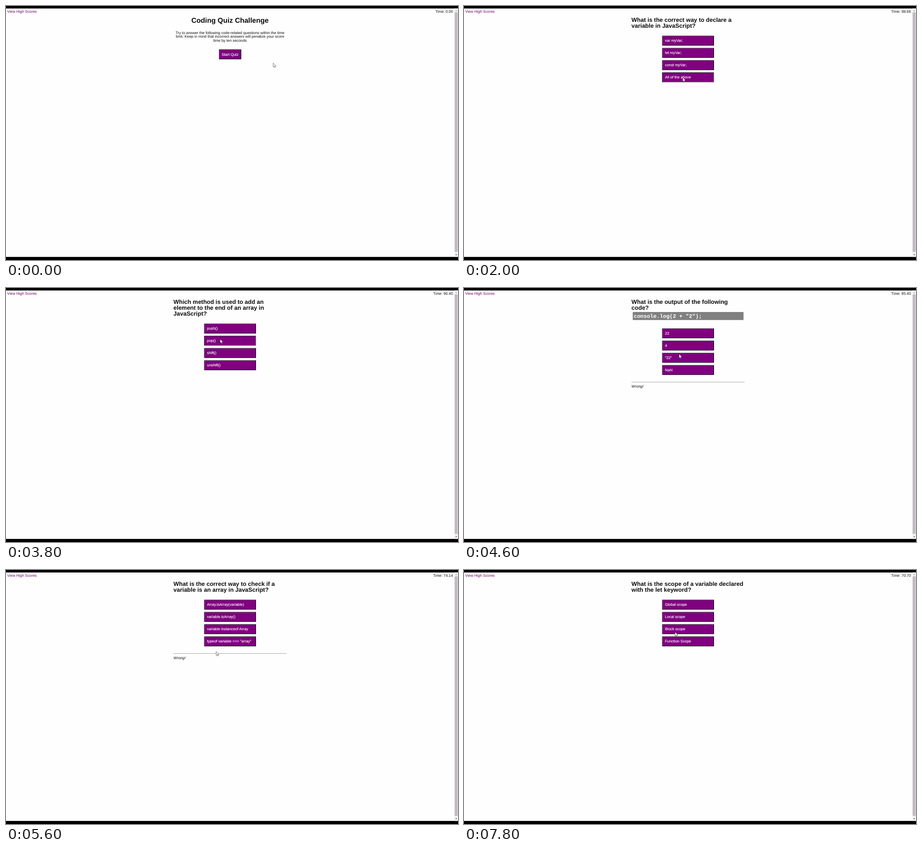
An HTML page that plays this animation: 998x561 px, repeating every 8000 ms.

```html
<!DOCTYPE html>
<html lang="en">
<head>
<meta charset="utf-8">
<title>Coding Quiz Challenge</title>
<style>
  html, body { margin: 0; width: 100%; height: 100%; overflow: hidden; background: #000; }
  svg { display: block; width: 100vw; height: 100vh; }
  text { font: 8.317px "Liberation Sans", Arial, sans-serif; fill: #0c0c0c; white-space: pre; text-rendering: geometricPrecision; }
  .title { font-size: 15.6px; font-weight: bold; }
  .question { font-size: 12.99px; font-weight: bold; }
  .code { font: bold 11.95px "Liberation Mono", "Courier New", monospace; fill: #fff; }
  .label { fill: #fff; stroke: #fff; stroke-width: .15px; }
  .link { fill: #6c006c; }
  .verdict { font-style: italic; }
  .mid { text-anchor: middle; }
  .end { text-anchor: end; }
</style>
</head>
<body>
<svg viewBox="0 0 998 561">
  <rect width="998" height="561" fill="#000"/>
  <rect y="5.5" width="998" height="548.7" fill="#fefefe"/>
  <rect x="990" y="5.5" width="8" height="548.7" fill="#f3f1f3"/>
  <rect x="990.6" y="14" width="6.6" height="529" fill="#c1bcc1"/>
  <path d="M992 11.2h4l-2-2.4z" fill="#a3a3a3"/>
  <path d="M992 548.4h4l-2 2.4z" fill="#505050"/>
  <text class="link" x="2.6" y="14.7">View High Scores</text>
  <text class="end" id="clock" x="986.8" y="14.7"></text>
  <g id="page"></g>
  <path id="cursor" d="M0 0V8.8L2 7L3.3 10L4.7 9.4L3.4 6.5H6.2Z" fill="#fff" stroke="#222" stroke-width=".6"/>
</svg>
<script>
const LOOP = 8000, STEP = 200, FEEDBACK = 1200;
const $ = id => document.getElementById(id);

// at: when the screen appears, pick: answer pressed just before the next one
const questions = [
  { at: 1000, pick: 3,
    lines: ['What is the correct way to declare a', 'variable in JavaScript?'],
    answers: ['var myVar;', 'let myVar;', 'const myVar;', 'All of the above'] },
  { at: 2200, pick: 1, verdict: 'Correct!',
    lines: ['Which method is used to add an', 'element to the end of an array in', 'JavaScript?'],
    answers: ['push()', 'pop()', 'shift()', 'unshift()'] },
  { at: 4000, pick: 3, verdict: 'Wrong!', code: 'console.log(2 + "2");',
    lines: ['What is the output of the following', 'code?'],
    answers: ['22', '4', '"22"', 'NaN'] },
  { at: 5400, pick: 0, verdict: 'Wrong!',
    lines: ['What is the correct way to check if a', 'variable is an array in JavaScript?'],
    answers: ['Array.isArray(variable)', 'variable.isArray()', 'variable instanceof Array', 'typeof variable === "array"'] },
  { at: 6400, verdict: 'Correct!',
    lines: ['What is the scope of a variable declared', 'with the let keyword?'],
    answers: ['Global scope', 'Local scope', 'Block scope', 'Function Scope'] }
];

// [time, x, y]: the pointer rests around each click
const path = [
  [0, 590, 126], [700, 506, 108], [1200, 506, 108],
  [1800, 483, 158], [2600, 483, 158],
  [3400, 473, 113], [4200, 473, 113],
  [4600, 475, 146], [5000, 464, 180], [5600, 464, 180],
  [6200, 464, 78], [6800, 464, 78], [7600, 466, 137]
];
// [time, seconds used]
const used = [[1000, .08], [5600, 5.86], [7800, 9.3]];

function sample(keys, t) {
  const i = keys.findIndex(k => k[0] > t);
  if (i < 0) return keys[keys.length - 1].slice(1);
  if (i === 0) return keys[0].slice(1);
  const a = keys[i - 1], b = keys[i], f = (t - a[0]) / (b[0] - a[0]);
  return a.slice(1).map((v, n) => v + (b[n + 1] - v) * f);
}

const rect = (x, y, w, h, fill, extra = '') =>
  `<rect x="${x}" y="${y}" width="${w}" height="${h}" fill="${fill}" ${extra}/>`;
const text = (x, y, s, cls = '') => `<text x="${x}" y="${y}" class="${cls}">${s}</text>`;

function button(x, y, w, label, down) {
  const h = 21.8, b = 1.04, colors = ['#6a6a6a', '#000'];
  const [light, dark] = down ? colors.reverse() : colors;
  return rect(x, y, w, h, dark) +
    `<path d="M${x} ${y}h${w}l${-b} ${b}h${2 * b - w}v${h - 2 * b}l${-b} ${b}z" fill="${light}"/>` +
    rect(x + b, y + b, w - 2 * b, h - 2 * b, '#800080') +
    text(x + 6.2, y + 13.75, label, 'label');
}

function intro(t) {
  const lines = [
    'Try to answer the following code-related questions within the time',
    'limit. Keep in mind that incorrect answers will penalize your score',
    'time by ten seconds'
  ];
  return text(494.6, 37, 'Coding Quiz Challenge', 'title mid') +
    lines.map((s, i) => text(494.6, 62 + i * 8.317, s, 'mid')).join('') +
    button(470, 95.8, 49.4, 'Start Quiz', t >= 800);
}

function quiz(q, t, next) {
  const top = q.code ? 89.1 : 39.7 + 13 * q.lines.length;
  const pressed = next && t >= next.at - STEP ? q.pick : -1;
  let out = q.lines.map((s, i) => text(369.8, 35 + i * 13, s, 'question')).join('');
  if (q.code) out += rect(372.6, 53, 244.6, 17.8, '#808080', 'rx="1.2"') + text(375, 66, q.code, 'code');
  out += q.answers.map((s, i) => button(437.6, top + i * 27, 114.4, s, i === pressed)).join('');
  if (q.verdict && t < q.at + FEEDBACK) {
    const y = top + 118.2;
    out += rect(369.8, y, 249.6, 1, q.verdict === 'Wrong!' ? '#a4a4a4' : '#d8d8d8') +
      text(369.8, y + 13.1, q.verdict, 'verdict');
  }
  return out;
}

function draw(t) {
  const shown = questions.filter(q => q.at <= t);
  const n = shown.length;
  const penalty = 10 * shown.filter(q => q.verdict === 'Wrong!').length;
  const left = n ? 100 - penalty - sample(used, t)[0] : 0;
  $('clock').textContent = 'Time: ' + left.toFixed(2);
  $('page').innerHTML = n ? quiz(questions[n - 1], t, questions[n]) : intro(t);
  $('cursor').setAttribute('transform', `translate(${sample(path, t)})`);
}

let last = -1;
function tick() {
  const t = Math.floor(performance.now() % LOOP / STEP) * STEP;
  if (t !== last) draw(last = t);
  requestAnimationFrame(tick);
}
tick();
</script>
</body>
</html>
```
